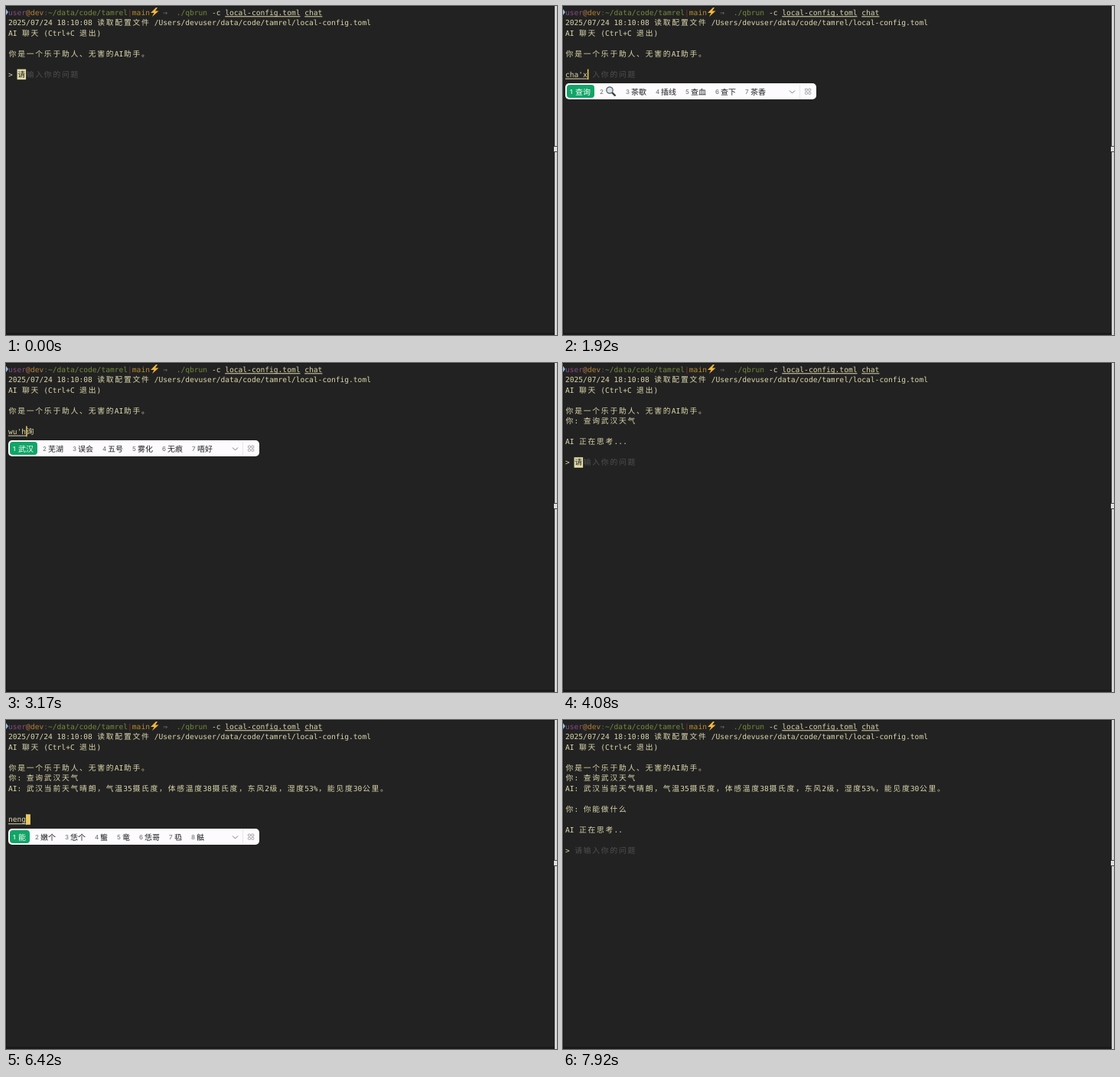
Recreate the animation shown at these times as an HTML page with a canvas. Size 720 by 430 pixels, loop 8000 ms.

```html
<!DOCTYPE html>
<html lang="zh-CN">
<head>
<meta charset="utf-8">
<title>终端聊天</title>
<style>
  html, body { margin: 0; width: 100%; height: 100%; overflow: hidden; background: #222; }
  canvas { display: block; }
</style>
</head>
<body>
<canvas id="stage" width="720" height="430"></canvas>
<script>
const ctx = document.getElementById('stage').getContext('2d');
const LOOP = 8000, BLINK = 530, DOT_TIME = 300;
const LEFT = 3, CELL = 5.78, TOP = 1.3, ROW = 13.55;
const BG = '#222222', CREAM = '#dcd7ab', DIM = '#505050', YELLOW = '#f0cd55';
const MONO = '9.6px "DejaVu Sans Mono", monospace';
const CJK = '9.8px "Noto Sans CJK SC", "Noto Sans CJK", sans-serif';
const CANDIDATE = '500 10px "Noto Sans CJK SC", "Noto Sans CJK", sans-serif';
const DIGIT = '500 8px Inter, sans-serif';

const FIRST_SENT = 4000, ANSWERED = 5660, SECOND_SENT = 7250;

// time, committed text, pinyin being composed, candidates
const INPUT = [
  [0, '', '', ''],
  [1750, '', 'ch', '吃 出 从 成 车 长 查 穿'],
  [1830, '', 'cha', '查 茶 差 插 叉 察 岔 刹'],
  [1920, '', "cha'x", '查询 🔍 茶歇 插线 查血 查下 茶香'],
  [2000, '', "cha'xu", '查询 🔍 插叙 查需 茶叙 差序'],
  [2080, '', "cha'xun", '查询 🔍 查寻 茶讯 查 茶 差'],
  [2250, '查询', '', ''],
  [3000, '查询', 'w', '我 为 无 问 完 位 玩 外'],
  [3080, '查询', 'wu', '无 五 物 屋 雾 舞 误 午'],
  [3170, '查询', "wu'h", '武汉 芜湖 误会 五号 雾化 无痕 唔好'],
  [3250, '查询', "wu'ha", '武汉 无害 五号 唔好 无函 五行'],
  [3330, '查询', "wu'han", '武汉 无汗 无憾 五汉 无 五 物'],
  [3420, '查询武汉', '', ''],
  [3500, '查询武汉', 'ti', '题 提 体 替 踢 梯 蹄 剃'],
  [3580, '查询武汉', 'tian', '天 添 田 填 甜 舔 恬 腆'],
  [3670, '查询武汉', "tian'q", '天气 天晴 田七 天桥 添气 填漆 天'],
  [3750, '查询武汉', "tian'qi", '天气 田七 天启 添气 填漆 天 添'],
  [3830, '查询武汉天气', '', ''],
  [FIRST_SENT, '', '', ''],
  [6080, '', 'n', '你 那 能 年 呢 拿 女 内'],
  [6170, '', 'ni', '你 呢 泥 尼 逆 拟 腻 妮'],
  [6250, '你', '', ''],
  [6340, '你', 'nen', '嫩 恁 能 嫰 嫩 黁 恁'],
  [6420, '你', 'neng', '能 嫩个 恁个 螚 竜 恁哥 㲌 䏻'],
  [6500, '你', "neng'z", '能在 能做 能走 能 嫩 能造 能找'],
  [6580, '你', "neng'zuo", '能做 能坐 能作 能左 能 嫩 恁'],
  [6670, '你', "neng'zuo's", '能做什么 能做事 能坐 能做 能 嫩'],
  [6840, '你', "neng'zuo'shen", '能做什 能做神 能做 能坐 能 嫩'],
  [6920, '你', "neng'zuo'shen'me", '能做什么 能做 能坐 能作 能 嫩'],
  [7080, '你能做什么', '', ''],
  [SECOND_SENT, '', '', '']
];

const PROMPT = [
  ['user', '#844c82'], ['@', '#bd7a42'], ['dev', '#b08036'], [':', '#5c5c4a'],
  ['~/data/code/tamrel', '#748a3c'], ['|', '#84342c'], ['main', '#b78a30'],
  ['   ', BG], ['⇒', '#75826f'], ['  ', BG], ['./qbrun', '#71883a'], [' -c ', CREAM],
  ['local-config.toml', CREAM, true], [' ', CREAM], ['chat', CREAM, true]
];

const isWide = ch => ch.codePointAt(0) > 0x2e7f;
const columns = text => [...text].reduce((n, ch) => n + (isWide(ch) ? 2 : 1), 0);
const colX = col => LEFT + col * CELL;
const rowY = row => TOP + row * ROW;

function box(x, y, w, h, color, radius = 0) {
  ctx.fillStyle = color;
  ctx.beginPath();
  ctx.roundRect(x, y, w, h, radius);
  ctx.fill();
}

function line(points, color, width = 1) {
  ctx.strokeStyle = color;
  ctx.lineWidth = width;
  ctx.beginPath();
  points.forEach(([x, y]) => ctx.lineTo(x, y));
  ctx.stroke();
}

function polygon(points, color) {
  ctx.fillStyle = color;
  ctx.beginPath();
  points.forEach(([x, y]) => ctx.lineTo(x, y));
  ctx.fill();
}

function label(text, x, y, font, color) {
  ctx.font = font;
  ctx.fillStyle = color;
  ctx.fillText(text, x, y);
}

// Writes text on the terminal grid, skipping cells left of hideBefore.
function write(text, col, row, color = CREAM, hideBefore = 0) {
  for (const ch of text) {
    const wide = isWide(ch);
    if (col >= hideBefore && ch !== ' ')
      label(ch, colX(col) + (wide ? 0.6 : 0), rowY(row) + 10.2, wide ? CJK : MONO, color);
    col += wide ? 2 : 1;
  }
  return col;
}

function underline(col, count, row) {
  box(colX(col), rowY(row) + 12, count * CELL, 1, CREAM);
}

function drawHeader() {
  let col = 0;
  for (const [text, color, linked] of PROMPT) {
    if (linked) underline(col, text.length, 0);
    col = write(text, col, 0, color);
  }
  polygon([[0, 4], [3, 8], [0, 12]], '#8dbce6');
  polygon([[196, 2], [189, 9], [193.5, 9], [191, 14], [199.5, 6.5], [195, 6.5], [198, 2]], '#f3b83c');
  write('2025/07/24 18:10:08 读取配置文件 /Users/devuser/data/code/tamrel/local-config.toml', 0, 1);
  write('AI 聊天 (Ctrl+C 退出)', 0, 2);
  write('你是一个乐于助人、无害的AI助手。', 0, 4);
}

function drawThinking(elapsed, row) {
  const dots = ['...', '.', '..'][Math.floor(elapsed / DOT_TIME) % 3];
  write('AI 正在思考' + dots, 0, row);
}

// Draws the conversation and returns the row of the input line.
function drawChat(t) {
  if (t < FIRST_SENT) return 6;
  write('你: 查询武汉天气', 0, 5);
  if (t < ANSWERED) {
    drawThinking(t - FIRST_SENT, 7);
    return 9;
  }
  write('AI: 武汉当前天气晴朗，气温35摄氏度，体感温度38摄氏度，东风2级，湿度53%，能见度30公里。', 0, 6);
  if (t < SECOND_SENT) return 9;
  write('你: 你能做什么', 0, 8);
  drawThinking(t - SECOND_SENT, 10);
  return 12;
}

function drawMagnifier(x, y) {
  line([[x + 8, y + 8], [x + 12.5, y + 12.5]], '#3b3b3d', 2.4);
  ctx.fillStyle = '#d5e4ec';
  ctx.strokeStyle = '#55585c';
  ctx.lineWidth = 1.2;
  ctx.beginPath();
  ctx.arc(x + 5, y + 5, 4.2, 0, 7);
  ctx.fill();
  ctx.stroke();
}

function drawCandidates(list, y) {
  box(LEFT, y, 328, 21, '#fdfbfe', 5);
  let x = 9;
  list.split(' ').forEach((word, i) => {
    const icon = word === '🔍';
    const width = icon ? 15 : [...word].length * 10;
    if (x + width > 285) return;
    if (!i) box(5, y + 2, width + 16, 17, '#12a567', 4);
    label(i + 1, x, y + 14, DIGIT, i ? '#77777c' : '#ffffff');
    if (icon) drawMagnifier(x + 8, y + 4);
    else label(word, x + 7, y + 14.5, CANDIDATE, i ? '#1c1c1e' : '#ffffff');
    x += width + 19;
  });
  line([[296, y + 9.5], [299.5, y + 13], [303, y + 9.5]], '#77777c');
  box(309, y + 2, 1, 17, '#e9e7ea');
  ctx.strokeStyle = '#99999d';
  ctx.lineWidth = 0.9;
  for (const dx of [0, 4.4]) for (const dy of [0, 4.4]) {
    ctx.beginPath();
    ctx.roundRect(316.4 + dx, y + 7 + dy, 3, 3, 1);
    ctx.stroke();
  }
}

function drawInput(t, row) {
  const past = INPUT.filter(step => step[0] <= t);
  const [, typed, pinyin, list] = past[past.length - 1];
  const shown = pinyin.length;
  const y = rowY(row);
  // Sending does not restart the blink; committing text does.
  const reset = past.filter(step => step[1] && !step[2]).pop() || INPUT[0];
  const cursorOn = Math.floor((t - reset[0]) / BLINK) % 2 === 0;

  write('>', 0, row, CREAM, shown);
  const end = write(typed, 2, row, CREAM, shown);
  if (!typed) write('请输入你的问题', 2, row, DIM, shown);
  if (cursorOn && end >= shown) {
    box(colX(end), y, typed ? CELL : CELL * 2, ROW, shown ? '#e6c968' : '#e3dda9');
    if (!typed) write('请', 2, row, BG);
  }
  if (!shown) return;
  write(pinyin, 0, row);
  underline(0, columns(pinyin), row);
  box(colX(shown), y, 1.5, ROW, YELLOW);
  drawCandidates(list, Math.round(y + 18.4));
}

function drawWindowEdges() {
  box(0, 0, 720, 1, '#191919');
  box(0, 0, 1, 430, '#181818');
  box(0, 427, 720, 3, '#1a1a1a');
  box(717, 0, 3, 430, '#d4d4d4');
  box(716, 183, 4, 8, '#e2e2e2');
  box(716, 183, 4, 1, '#444444');
  box(716, 190, 4, 1, '#444444');
}

function draw() {
  const t = performance.now() % LOOP;
  ctx.textRendering = 'geometricPrecision';
  box(0, 0, 720, 430, BG);
  drawWindowEdges();
  drawHeader();
  drawInput(t, drawChat(t));
  requestAnimationFrame(draw);
}
draw();
</script>
</body>
</html>
```
